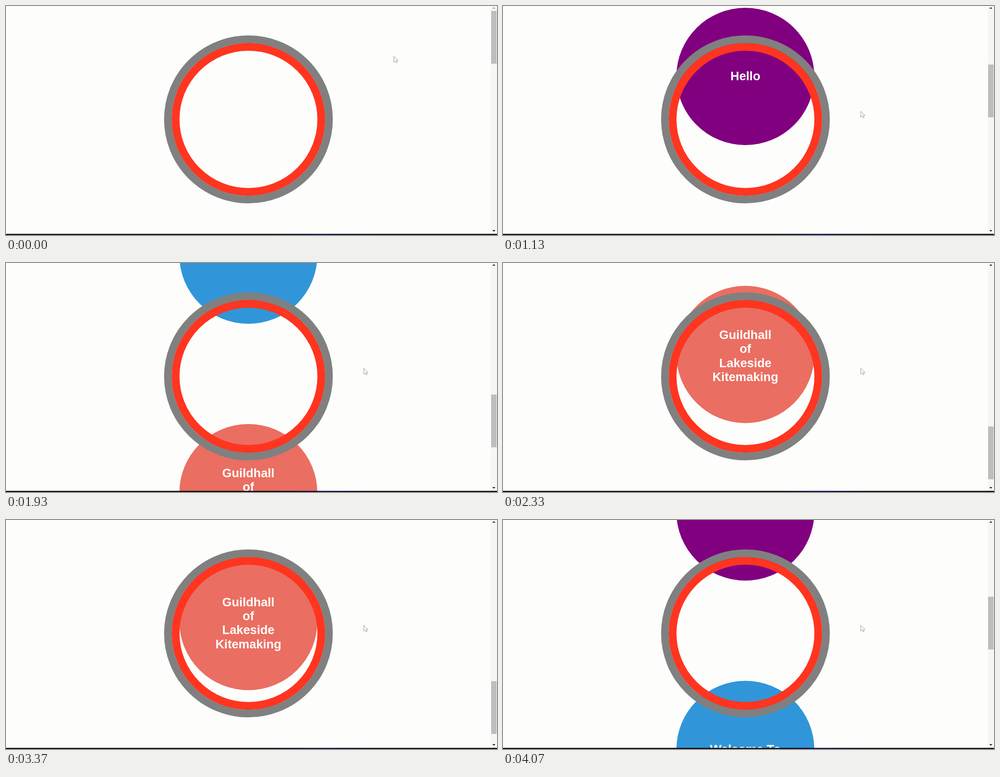
An HTML page that plays this animation: 1093x512 px, repeating every 4110 ms.

```html
<!DOCTYPE html>
<html lang="en">
<head>
<meta charset="utf-8">
<title>Scrolling circles</title>
<style>
  html, body { margin: 0; width: 100%; height: 100%; overflow: hidden; background: #fdfdfc; }
  svg { display: block; width: 100%; height: 100%; }
  text { font: bold 27.2px "Liberation Sans", Arial, sans-serif; fill: #fff; text-anchor: middle; }
</style>
</head>
<body>
<svg viewBox="0 0 1093 512">
  <defs>
    <linearGradient id="edge">
      <stop offset=".55" stop-color="#08080c"/>
      <stop offset=".64" stop-color="#0c0840"/>
      <stop offset=".75" stop-color="#08080c"/>
    </linearGradient>
  </defs>
  <rect width="1093" height="512" fill="#fdfdfc"/>
  <g id="page"></g>
  <g fill="none" stroke-width="17.2">
    <circle cx="539.7" cy="253.5" r="179.2" stroke="#808080"/>
    <circle cx="539.7" cy="253.5" r="162.1" stroke="#ff3520"/>
  </g>
  <rect x="1079" width="14" height="510" fill="#f6f6f5"/>
  <rect id="thumb" x="1080" width="12" height="118" fill="#bdbdbd"/>
  <path id="up" d="M1082.5 6l3.5-3.5 3.5 3.5z"/>
  <path id="down" d="M1082.5 501l3.5 3.5 3.5-3.5z"/>
  <rect y="509.5" width="1093" height="2.5" fill="url(#edge)"/>
  <path id="cursor" d="M.5.5v13l3-2.8 2.2 4.4 2.2-1-2-4.2h4z" fill="#fff" stroke="#8a8a8a" stroke-width=".9"/>
</svg>
<script>
const LOOP = 4110, STEP = 100 / 3, LAST = 122;
const MAX = 1588, GAP = 531, FIRST_Y = 676.5, CX = 539.5;
const $ = id => document.getElementById(id);

// Each circle: colour, first baseline relative to its centre, lines of text
const circles = [
  ['#800080', 8.5, ['Hello']],
  ['#3096d9', 8.5, ['Welcome To']],
  ['#ea6e61', -34.5, ['Guildhall', 'of', 'Lakeside', 'Kitemaking']]
];

$('page').innerHTML = circles.map(([fill, base, lines], i) =>
  `<g transform="translate(${CX} ${FIRST_Y + i * GAP})"><circle r="153.5" fill="${fill}"/>` +
  lines.map((s, k) => `<text y="${base + k * 31.4}">${s}</text>`).join('') + '</g>'
).join('');

// Scroll keys: time, offset, speed
const keys = [
  [480, 0, 0], [1130, 519, .86], [1930, 1225, .84], [2330, 1534, .56],
  [2480, MAX, 0], [3200, MAX, 0], [3600, 1268, -1.15], [4070, 694.5, -1.22]
];

function scrollAt(t) {
  if (t <= keys[0][0]) return 0;
  const i = Math.max(1, keys.findIndex(k => t <= k[0]));
  const [t0, a, va] = keys[i - 1], [t1, b, vb] = keys[i];
  const d = t1 - t0, u = Math.min(1, (t - t0) / d), w = 1 - u;
  return w * w * ((1 + 2 * u) * a + u * d * va) + u * u * ((3 - 2 * u) * b - w * d * vb);
}

function move(id, x, y) {
  $(id).setAttribute('transform', `translate(${x} ${y})`);
}

function draw(ms) {
  const n = Math.min(LAST, Math.floor((ms % LOOP + 4) / STEP));
  // Snap to the centisecond grid so the keys fall on whole steps
  const t = Math.round(n * STEP / 10) * 10;
  const s = Math.round(scrollAt(t) * 2) / 2;
  move('page', 0, -s);
  $('thumb').setAttribute('y', 11 + s / MAX * 367);
  $('up').setAttribute('fill', s > 0 ? '#303030' : '#a3a3a3');
  $('down').setAttribute('fill', s < MAX ? '#202020' : '#a3a3a3');

  const u = Math.min(1, Math.max(0, (t - 30) / 440)), e = u * u * (3 - 2 * u);
  move('cursor', 863 - 67 * e, 112 + 123 * e);
}

let start;
function tick(now) {
  start ??= now;
  draw(now - start);
  requestAnimationFrame(tick);
}
draw(0);
requestAnimationFrame(tick);
</script>
</body>
</html>
```
